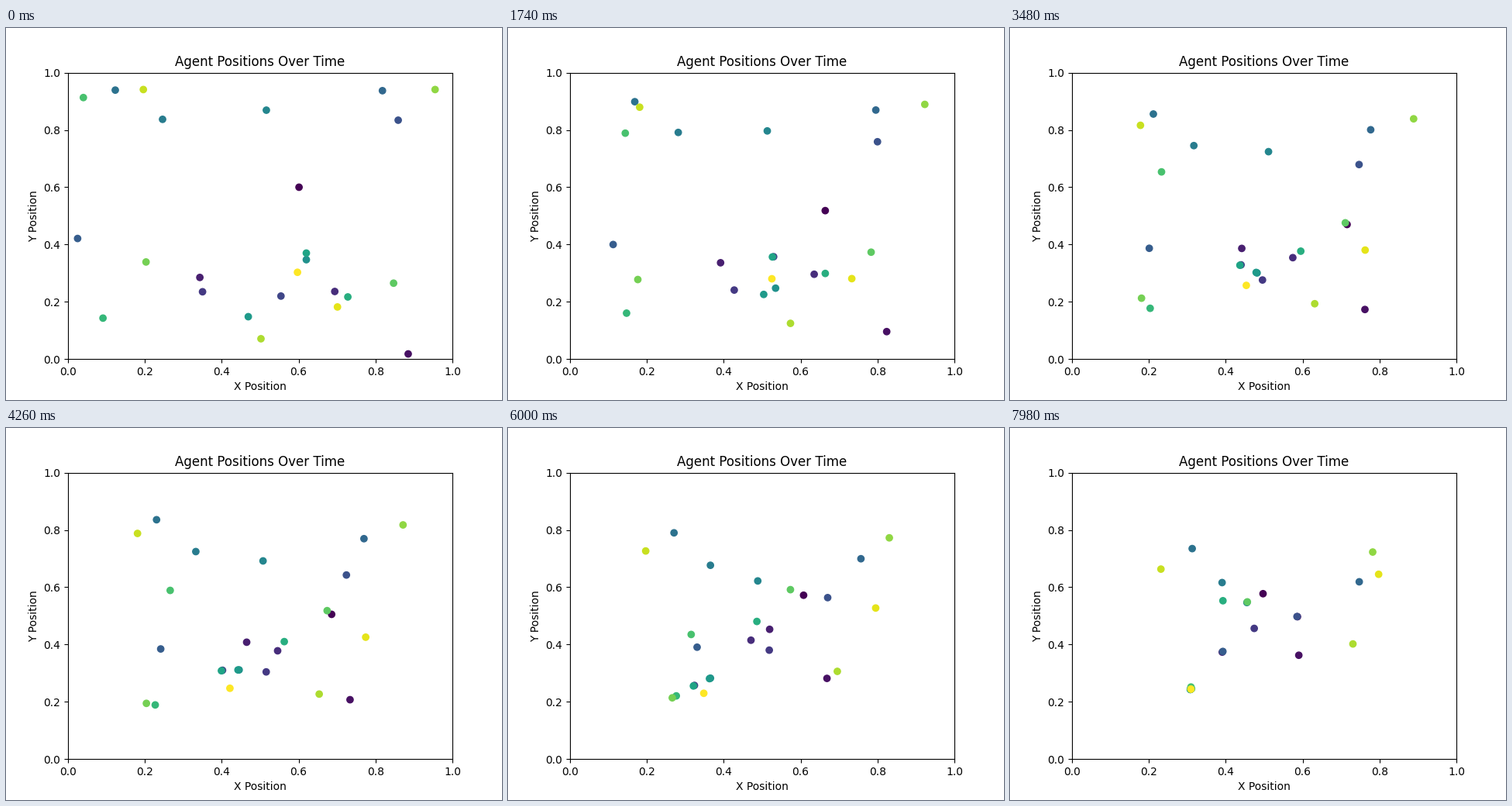
Write a matplotlib script that moves like this. It is 640 px wide and 480 px high and loops after 8 s.

```python
import numpy as np
import matplotlib.pyplot as plt
from matplotlib.animation import FuncAnimation

STEP_MS = 60
TICK_MS = 20
LOOP_MS = 8000

# Each agent heads for the next one in its chain.
CHAINS = [
    (2, 6, 4, 15, 22, 7, 3, 17, 24, 16, 12, 13, 14, 19, 16),
    (8, 21, 23, 20, 13),
    (0, 18, 11, 13),
    (9, 10, 15),
    (1, 15),
    (5, 14),
]

# Start x, start y, and the number of steps needed to cross the plot.
AGENTS = np.array([
    (.601, .600, 281), (.885, .018, 293), (.343, .285, 410),
    (.694, .236, 345), (.350, .235, 373), (.554, .220, 164),
    (.859, .834, 303), (.025, .421, 323), (.818, .937, 407),
    (.123, .939, 476), (.246, .837, 500), (.516, .869, 400),
    (.620, .347, 221), (.469, .148, 338), (.620, .370, 307),
    (.728, .217, 279), (.091, .143, 493), (.040, .913, 179),
    (.847, .265, 231), (.203, .339, 433), (.955, .941, 476),
    (.502, .071, 323), (.196, .941, 457), (.701, .182, 279),
    (.597, .303, 385),
])
START = AGENTS[:, :2]
SPEED = 1 / AGENTS[:, 2]

prey = np.zeros(len(AGENTS), int)
for chain in CHAINS:
    prey[list(chain[:-1])] = chain[1:]


def advance(pos):
    """Move every agent straight at its prey, never past it."""
    gap = pos[prey] - pos
    dist = np.hypot(*gap.T)
    share = np.minimum(1, SPEED / np.maximum(dist, 1e-9))
    return pos + gap * share[:, None]


path = [START]
for _ in range(LOOP_MS // STEP_MS):
    path.append(advance(path[-1]))

fig, ax = plt.subplots(figsize=(6.4, 4.8), dpi=100)
dots = ax.scatter(*START.T, c=np.arange(len(START)), cmap="viridis")
ax.set(xlim=(0, 1), ylim=(0, 1), title="Agent Positions Over Time",
       xlabel="X Position", ylabel="Y Position")


def update(tick):
    dots.set_offsets(path[tick * TICK_MS // STEP_MS])
    return (dots,)


anim = FuncAnimation(fig, update, frames=LOOP_MS // TICK_MS, interval=TICK_MS,
                     repeat=True, repeat_delay=0, blit=True)
plt.show()
```
